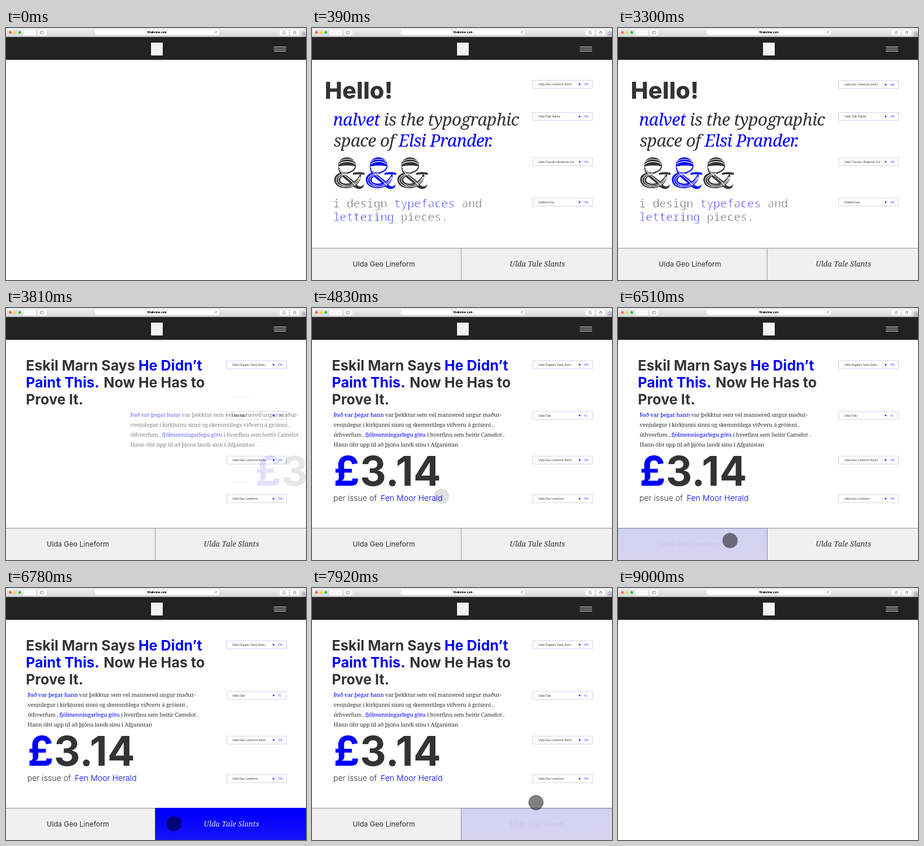
These frames come from a looping animation (513x431 px, 9.42 s). An HTML page:

```html
<!DOCTYPE html>
<html lang="en">
<head>
<meta charset="utf-8">
<title>Type specimen page</title>
<style>
html, body { margin: 0; width: 100%; height: 100%; overflow: hidden; background: #fff; }
svg { display: block; width: 100vw; height: 100vh; }
text { fill: #333; font-family: Inter, "Liberation Sans", sans-serif; }
.b { fill: #00f; }
.hello { font-size: 40px; font-weight: 800; letter-spacing: .1px; }
.lead { font: italic 29px "Noto Serif", serif; letter-spacing: -.62px; }
/* A white outline thins the strokes of the typewriter face. */
.typed { font: 200 19.3px "Noto Sans Mono", "Liberation Mono", monospace; stroke: #fff; stroke-width: .9; }
.head { font-size: 24.2px; font-weight: 700; letter-spacing: .05px; }
.para { font: 9.6px "Noto Serif", serif; letter-spacing: -.22px; }
.price { font-size: 69.5px; font-weight: 700; letter-spacing: .4px; }
.issue { font-size: 13.6px; font-weight: 300; }
.pick { font-size: 4.95px; }
.sans { font-size: 12.1px; }
.serif { font: italic 12.6px "Noto Serif", serif; }
.url { font-size: 4.6px; font-weight: 800; fill: #000; }
.line { fill: none; stroke: #888; stroke-width: .7; }
</style>
</head>
<body>
<svg viewBox="0 0 513 431" preserveAspectRatio="none">
  <defs>
    <linearGradient id="chrome" x2="0" y2="1">
      <stop stop-color="#efefef"/><stop offset="1" stop-color="#d6d6d6"/>
    </linearGradient>
    <linearGradient id="hover" x2="0" y2="1">
      <stop offset=".2" stop-color="#00f"/><stop offset="1" stop-color="#1414f8"/>
    </linearGradient>
    <g id="amp">
      <path d="M7 15C5 -6 38 -6 37 15C33 12.500 12 12.500 7 15Z"/>
      <path d="M37 14C37 21 31 25 22 27L20 26C29 23 35 20 35.500 14Z"/>
      <path d="M0 38C0 27 12 23 27 26C18 29 11 32 10 38C11 47 36 48 43.500 28.500H46C46 58 1 58 0 38Z"/>
      <path d="M7 14C12 28 28 32 37 44C41 50 47 51 51 45C50 56 38 55 32 48C24 38 6 32 7 14Z"/>
      <path d="M32 26C38 24 47 24 52 26V29C47 28 38 28 32 29Z"/>
      <g fill="none" stroke="#fff" stroke-width="1.100">
        <path d="M9 7C14 1 30 1 35 7M8 11.500C13 5 31 5 36 11.500"/>
        <path d="M22 26.800C12 27 4 31 3.400 38C4 54 38 55 44.700 33"/>
        <path d="M22 27.500C13 29 7.500 32 6.800 38C8 50.500 35 52 44 32"/>
        <path d="M9 19.500C14 31 29 36 36.500 48"/>
      </g>
    </g>
  </defs>

  <rect width="513" height="431" fill="#fff"/>

  <g id="picks"></g>

  <g class="first"><text class="hello" x="21.800" y="121">Hello!</text></g>
  <g class="first">
    <text class="lead" x="36" y="167"><tspan class="b">nalvet</tspan> is the typographic</text>
    <text class="lead" x="37" y="203">space of <tspan class="b" x="148">Elsi Prander.</tspan></text>
  </g>
  <g class="first">
    <use href="#amp" x="38" y="222" fill="#333"/>
    <use href="#amp" x="92" y="222" fill="#00f"/>
    <use href="#amp" x="146" y="222" fill="#333"/>
  </g>
  <g class="first">
    <text class="typed" x="36" y="307">i design <tspan class="b">typefaces</tspan> and</text>
    <text class="typed" x="36" y="330"><tspan class="b">lettering</tspan> pieces.</text>
  </g>

  <g class="second">
    <text class="head" x="34" y="107">Eskil Marn Says <tspan class="b" x="226.500">He Didn’t</tspan></text>
    <text class="head" x="34" y="136"><tspan class="b">Paint This.</tspan> <tspan x="167">Now He Has to</tspan></text>
    <text class="head" x="34" y="165">Prove It.</text>
  </g>
  <g class="second">
    <text class="para" x="37" y="186"><tspan class="b">Það var þegar hann</tspan> var þekktur sem vel mannered ungur maður-</text>
    <text class="para" x="37" y="203">venjulegur í kirkjunni sinni og skemmtilega viðveru á gróinni ,</text>
    <text class="para" x="37" y="220">úthverfum , <tspan class="b">fjölmenningarlegu götu</tspan> í hverfinu sem heitir Camelot .</text>
    <text class="para" x="37" y="237">Hann ólst upp til að þjóna landi sínu í Afganistan</text>
  </g>
  <g class="second">
    <text class="price" x="37" y="304"><tspan class="b">£</tspan><tspan x="82">3.14</tspan></text>
  </g>
  <g class="second">
    <text class="issue" x="36.500" y="329.500">per issue of <tspan class="b" x="117.500">Fen Moor Herald</tspan></text>
  </g>

  <g id="tabs">
    <rect y="376" width="513" height="55" fill="#f0f0f0"/>
    <path d="M0 376.700H513M255.200 376V431" fill="none" stroke="#a4a4a4" stroke-width="1.200"/>
    <rect class="fill" y="376" width="255.500" height="55" fill="url(#hover)"/>
    <rect class="fill" x="255" y="376" width="258" height="55" fill="url(#hover)"/>
    <text class="sans label" x="69.500" y="407.500">Ulda Geo Lineform</text>
    <text class="serif label" x="338" y="407.500">Ulda Tale Slants</text>
  </g>
  <circle id="cursor" r="13"/>

  <rect width="513" height="15.500" fill="url(#chrome)"/>
  <g fill="#fff">
    <rect x="30" y="3" width="21" height="9.500" rx="1.500"/>
    <rect x="54" y="3" width="15" height="9.500" rx="1.500"/>
    <rect x="152" y="3" width="212" height="8.800" rx="3"/>
    <rect x="468" y="3" width="15" height="9.500" rx="1.500"/>
    <rect x="486" y="3" width="15" height="9.500" rx="1.500"/>
  </g>
  <circle cx="7.500" cy="7.700" r="2.400" fill="#ff5f57"/>
  <circle cx="15.500" cy="7.700" r="2.400" fill="#ffd21f"/>
  <circle cx="23.500" cy="7.700" r="2.400" fill="#1fd13a"/>
  <path class="line" d="M36.500 5.500L34.500 7.700L36.500 10M45 5.500L47 7.700L45 10" opacity=".45"/>
  <path class="line" d="M40.700 3V12.500" opacity=".25"/>
  <path class="line" d="M58.500 5.500H64.500V10H58.500ZM60.500 5.500V10"/>
  <path class="line" d="M360.300 6.500A1.700 1.700 0 1 0 360.500 8.500M360.700 5.500V7H359.300"/>
  <path class="line" d="M474.500 7H473.500V10.500H477.800V7H476.800M475.700 8.800V4.500M474.500 5.700L475.700 4.500L476.900 5.700"/>
  <path class="line" d="M491.500 7H494.500V10H491.500ZM492.800 7V5.500H495.800V8.700H494.500"/>
  <rect x="506" y="6.500" width="7" height="9" fill="#c6c6c6" stroke="#aaa" stroke-width=".5"/>
  <path class="line" d="M508 11H512M510 9V13"/>
  <text class="url" x="258" y="9.300" text-anchor="middle">Shakelew.com</text>
  <rect y="15.300" width="513" height="39.200" fill="#222220"/>
  <rect x="248" y="25" width="20" height="22" fill="#f1f3f0"/>
  <path d="M458 32.500H479M458 36H479M458 39.500H479" stroke="#eee" stroke-width="1.100"/>
</svg>
<script>
const LOOP = 9420, STEP = 30, SHIFT = 440;
const all = s => [...document.querySelectorAll(s)];
const first = all('.first'), second = all('.second');
const fills = all('.fill'), labels = all('.label');
const tabs = document.getElementById('tabs');
const cursor = document.getElementById('cursor');
const picks = document.getElementById('picks');

const prog = (t, start, len) => Math.min(1, Math.max(0, (t - start) / len));
const inOut = p => p < .5 ? 2 * p * p : 1 - 2 * (1 - p) ** 2;
const out3 = p => 1 - (1 - p) ** 3;
const mix = (a, b, p) => a + (b - a) * p;

function addPick(y, name) {
  const g = document.createElementNS('http://www.w3.org/2000/svg', 'g');
  g.innerHTML = `<rect x="-51" y="-7" width="102" height="13.600" fill="#fff" stroke="#cdcdf5" stroke-width=".9"/>
    <text class="pick" x="-41.500" y="1.800">${name}</text>
    <path class="b" d="M27.200 -1.200H30.800L29.300 1.800Z"/>
    <text class="pick b" x="37.500" y="1.800" opacity=".75">EN</text>`;
  picks.append(g);
  return { g, y };
}
const oldPicks = [
  addPick(96.5, 'Ulda Geo Lineform Demi'),
  addPick(151.5, 'Ulda Tale Slants'),
  addPick(229, 'Ulda Tuscan Ultrabold Cut'),
  addPick(298, 'Zolbek Fine')
];
const newPicks = [
  addPick(97.2, 'Ulda Organic Sans Dem...'),
  addPick(184, 'Ulda Tale'),
  addPick(260.3, 'Ulda Geo Lineform Demi'),
  addPick(326.3, 'Ulda Geo Lineform')
];
const language = newPicks[1].g.lastElementChild;

function setPick({ g, y }, alpha, flip = 1) {
  g.setAttribute('transform', `translate(428.500 ${y}) scale(1 ${flip})`);
  g.setAttribute('opacity', alpha);
}

// Enter from the right, leave to the left, fading with distance.
function slide(el, enter, leave) {
  const x = SHIFT * (1 - enter - leave);
  el.setAttribute('transform', `translate(${x} 0)`);
  el.setAttribute('opacity', enter * (1 - leave));
}

function drawText(t) {
  first.forEach((el, i) => slide(el,
    inOut(prog(t, 30 * i, 300)), inOut(prog(t, 3300 + 40 * i, 240))));
  const starts = [3500, 3644, 3738, 3780];
  second.forEach((el, i) => slide(el,
    inOut(prog(t, starts[i], 300)), inOut(prog(t, 8370 + 100 * i, 300))));
}

function drawPicks(t) {
  const shown = prog(t, 0, 360), gone = 1 - prog(t, 8370, 480);
  const flip = t < 3300 ? 1 : -Math.cos(Math.PI * prog(t, 3300, 300));
  const swapped = t >= 3450;
  oldPicks.forEach((p, i) => i
    ? setPick(p, shown * (1 - prog(t, 3300, 540)))
    : setPick(p, swapped ? 0 : shown, flip));
  newPicks.forEach((p, i) => i
    ? setPick(p, prog(t, 3360, 420) * gone)
    : setPick(p, swapped ? gone : 0, flip));
  language.textContent = t < 3900 ? 'EN' : 'IS';
}

function drawTabs(t) {
  const y = 56 * (1 - inOut(prog(t, 0, 360)) + inOut(prog(t, 8580, 390)));
  tabs.setAttribute('transform', `translate(0 ${y})`);
  const spans = [[4950, 240, 6420, 180], [6570, 210, 7800, 240]];
  spans.forEach(([a, da, b, db], i) => {
    const enter = prog(t, a, da), leave = prog(t, b, db);
    fills[i].setAttribute('opacity', out3(enter) * (1 - out3(leave)));
    const light = enter * (1 - leave ** 3);
    const c = mix(45, 222, light);
    labels[i].style.fill = `rgb(${c},${c},${mix(45, 255, light)})`;
  });
}

function drawCursor(t) {
  const a = inOut(prog(t, 4800, 390));
  const b = inOut(prog(t, 6420, 360));
  const c = inOut(prog(t, 7800, 240));
  let x = mix(mix(222, 178, a), 287, b), y = mix(mix(321, 397, a), 403, b);
  // Gently curved way out, up and to the right.
  x += 192 * c;
  y -= 58 * c + 28 * c * c;
  cursor.setAttribute('cx', x);
  cursor.setAttribute('cy', y);
  cursor.setAttribute('opacity', .5 * prog(t, 4800, 120) * (1 - prog(t, 7920, 120)));
}

function draw(ms) {
  const t = Math.floor(ms % LOOP / STEP) * STEP;
  drawText(t);
  drawPicks(t);
  drawTabs(t);
  drawCursor(t);
}

const begin = performance.now();
function tick() {
  draw(performance.now() - begin);
  requestAnimationFrame(tick);
}
tick();
</script>
</body>
</html>
```
